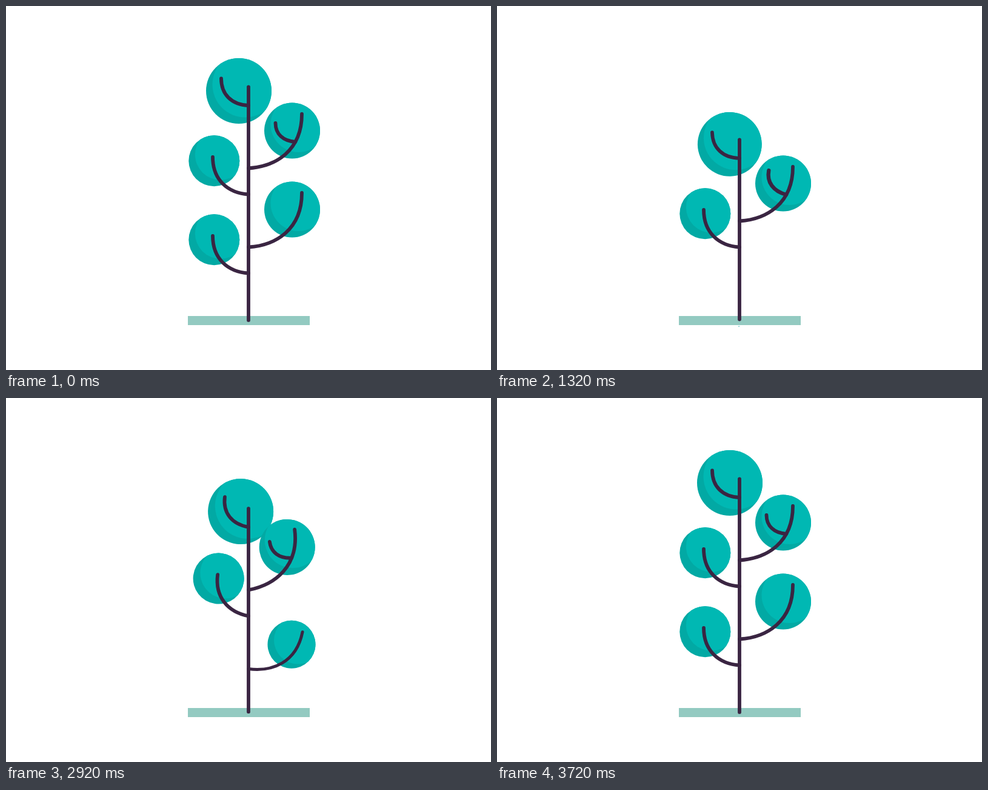
Animation of 800x600 px, one loop 4840 ms. Source, as an HTML page:

```html
<!DOCTYPE html>
<html lang="en">
<head>
<meta charset="utf-8">
<title>Growing tree</title>
<style>
  html, body { margin: 0; width: 100%; height: 100%; overflow: hidden; background: #fff; }
  svg { display: block; width: 800px; height: 600px; }
  .line { fill: none; stroke: #3a2542; stroke-width: 5.8; stroke-linecap: round; }
  .leaf { fill: #00b8b3; }
  .shade { fill: #02a9a4; }
  .ground { fill: #93cac1; }
</style>
</head>
<body>
<svg viewBox="0 0 800 600">
  <g id="scene">
    <rect id="ground" class="ground" x="300" y="511" width="201" height="15"/>
    <g id="tree">
      <g id="branches"></g>
      <line id="trunk" class="line" x1="400" x2="400"/>
    </g>
  </g>
</svg>
<script>
const LOOP = 4840, STEP = 40, BLANK_END = 440, FLOOR = 518, RISE = 87;
const LEFT = 'M-59 -61.5C-59 -24.5 -35 -2.5 0 0';
const RIGHT = 'M0 0C45 -3 88 -29 88 -89.5';
const HEAD = 'M-45 -44.5C-45 -18 -28 -1.5 0 0';
const TWIG = 'M-32.5 -31C-32.5 -13 -20 -1.5 0 0';

// side: 1 leans left, -1 leans right; grow: start, peak, end in ms
const specs = [
  { y: 164, side: 1, path: HEAD, leaf: [-16, -24, 54], grow: [1090, 1435, 1520], sways: true },
  { y: 310.5, side: 1, path: LEFT, leaf: [-56.7, -55.2, 42], grow: [500, 940, 1080], sways: true },
  { y: 267.5, side: -1, path: RIGHT, leaf: [72, -62, 46], grow: [563, 1163, 1300], sways: true,
    twig: { x: 77, y: -43.5, side: 1, path: TWIG, grow: [1000, 1340, 1620], lift: 11 } },
  { y: 440.5, side: 1, path: LEFT, leaf: [-56.7, -55.2, 42], grow: [2920, 3270, 3410] },
  { y: 397.5, side: -1, path: RIGHT, leaf: [72, -62, 46], grow: [2603, 3203, 3340] }
];

const $ = id => document.getElementById(id);
const clamp = v => Math.min(1, Math.max(0, v));
const span = (t, a, b) => clamp((t - a) / (b - a));
const smooth = u => u * u * (3 - 2 * u);
const out = u => 1 - (1 - u) ** 2;
const mix = (a, b, u) => a + (b - a) * u;

function add(parent, tag, attrs) {
  const el = document.createElementNS('http://www.w3.org/2000/svg', tag);
  for (const key in attrs) el.setAttribute(key, attrs[key]);
  return parent.appendChild(el);
}

function addBranch(parent, spec, i) {
  spec.el = add(parent, 'g', {});
  if (spec.leaf) {
    const [cx, cy, r] = spec.leaf;
    const clip = add(spec.el, 'clipPath', { id: 'clip' + i });
    add(clip, 'circle', { cx, cy, r });
    add(spec.el, 'circle', { class: 'shade', cx, cy, r });
    add(spec.el, 'circle', {
      class: 'leaf', cx: cx + 10.5, cy: cy - 10.5, r, 'clip-path': `url(#clip${i})`
    });
  }
  add(spec.el, 'path', { class: 'line', d: spec.path });
  if (spec.twig) addBranch(spec.el, spec.twig);
}

// Eases through [time, value] keys
function track(t, keys) {
  let value = keys[0][1];
  for (let i = 1; i < keys.length; i++) {
    const [a, from] = keys[i - 1], [b, to] = keys[i];
    if (t >= a) value = mix(from, to, smooth(span(t, a, b)));
  }
  return value;
}

function poseBranch(spec, t, x, y, sway) {
  const [start, peak, end] = spec.grow;
  const up = out(span(t, start, peak)), down = smooth(span(t, peak, end));
  const size = mix(mix(0.015, 1.1, up), 1, down);
  const angle = mix(mix(-80, spec.lift || 8.5, up), 0, down) + sway;
  spec.el.setAttribute('transform',
    `translate(${x} ${y}) rotate(${angle * spec.side}) scale(${size})`);
  if (spec.twig) poseBranch(spec.twig, t, spec.twig.x, spec.twig.y, 0);
}

function draw(time) {
  const t = time < STEP ? LOOP : time;
  $('scene').style.display = t < BLANK_END ? 'none' : '';

  const size = t < 850 ? 1.096 * out(span(t, 425, 850)) : track(t, [[850, 1.096], [960, 1]]);
  $('ground').setAttribute('transform',
    `translate(400.5 518.5) scale(${size}) translate(-400.5 -518.5)`);

  const stretch = out(span(t, 440, 1153));
  $('tree').setAttribute('transform', `translate(0 ${FLOOR * (1 - stretch)}) scale(1 ${stretch})`);

  const lift = smooth(span(t, 2480, 3440)), drop = RISE * (1 - lift);
  $('trunk').setAttribute('y1', 133.3 + drop);
  $('trunk').setAttribute('y2', mix(516.6, 517.9, lift));

  const sway = track(t, [[2480, 0], [3147, 9.8], [3460, -5.5], [3710, 0]]);
  for (const spec of specs) poseBranch(spec, t, 400, spec.y + drop, spec.sways ? sway : 0);
}

specs.forEach((spec, i) => addBranch($('branches'), spec, i));
const begin = performance.now();
function tick() {
  const time = (performance.now() - begin) % LOOP;
  draw(Math.floor(time / STEP) * STEP);
  requestAnimationFrame(tick);
}
tick();
</script>
</body>
</html>
```
